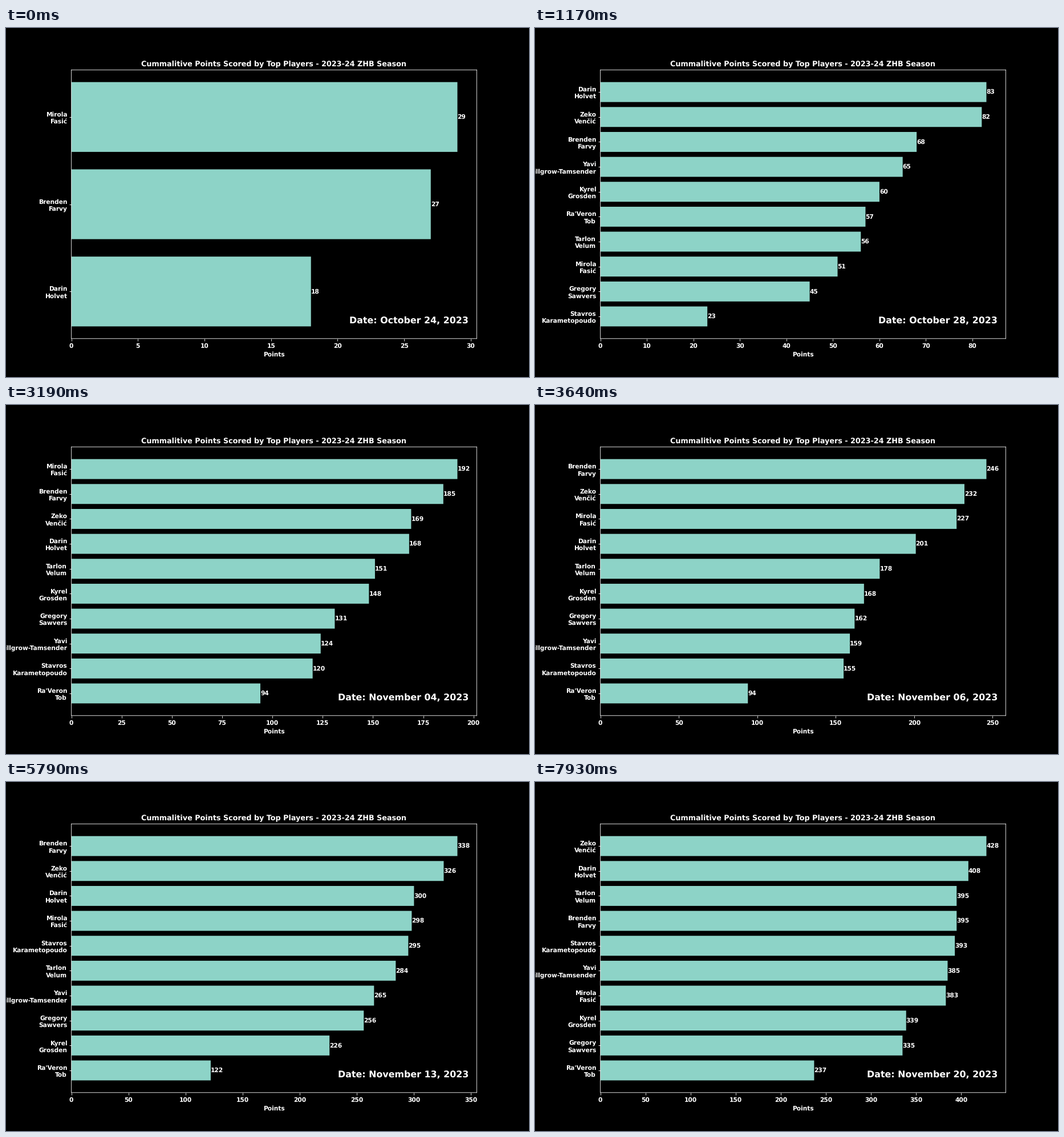
Animation, 917 px wide and 611 px high, one loop 8 s. Source, as a matplotlib script:

```python
import matplotlib.pyplot as plt
import numpy as np
from matplotlib.animation import FuncAnimation

WIDTH, HEIGHT, DPI = 917, 611, 76.4
FRAME_COUNT, INTERVAL = 123, 65

# Unsnapped paths and unhinted glyphs keep true sub-pixel positions.
plt.style.use("dark_background")
plt.rcParams.update({
    "font.family": "DejaVu Sans",
    "font.weight": "bold",
    "axes.labelweight": "bold",
    "axes.titleweight": "bold",
    "path.snap": False,
    "text.hinting": "none",
})

# Who plays on each day, starting on October 24.
SCHEDULE = (
    "MBD/ZYKRTG/DS/MBZYKRT/DKG/MBYRS/MBZYTGS/DK/"
    "MBZYKTGS/D/MBZKS/MDTG/BDZ/MBZYKTGS//MBDZYKTGS/S/DZYTG/BTS/MBDZYKG/"
    "KRTS/MZYG/DZKRTG/Y/MDKRTS/BZYKGS/MDZYRT/MBKRTGS"
).split("/")

# A day stays on screen for one frame per game played.
DAY_OF_FRAME = [day for day, games in enumerate(SCHEDULE) for _ in games]

# Totals after the first game and at the end of each key day;
# every game in between adds an equal share.
KEY_DAYS = (4, 11, 20, 27)
PLAYERS = {
    "G": ("Gregory\nSawvers", (26, 45, 131, 256, 335)),
    "R": ("Ra'Veron\nTob", (18, 57, 94, 122, 237)),
    "S": ("Stavros\nKarametopoudo", (23, 23, 120, 295, 393)),
    "K": ("Kyrel\nGrosden", (15, 60, 148, 226, 339)),
    "T": ("Tarlon\nVelum", (34, 56, 151, 284, 395)),
    "D": ("Darin\nHolvet", (18, 83, 168, 300, 408)),
    "Z": ("Zeko\nVenčić", (33, 82, 169, 326, 428)),
    "M": ("Mirola\nFasić", (29, 51, 192, 298, 383)),
    "Y": ("Yavi\nHillgrow-Tamsender", (31, 65, 124, 265, 385)),
    "B": ("Brenden\nFarvy", (27, 68, 185, 338, 395)),
}


def games_played(key, day):
    return "".join(SCHEDULE[:day + 1]).count(key)


def total_points(key, day):
    stops = [1] + [games_played(key, key_day) for key_day in KEY_DAYS]
    return round(np.interp(games_played(key, day), stops, PLAYERS[key][1]))


def standings(day):
    """Names and totals of everyone who has played, lowest total first."""
    totals = [(name, total_points(key, day))
              for key, (name, _) in PLAYERS.items() if games_played(key, day)]
    return sorted(totals, key=lambda entry: -entry[1])[::-1]


def date_text(day):
    month, number = ("October", 24 + day) if day < 8 else ("November", day - 7)
    return f"Date: {month} {number:02d}, 2023"


fig, ax = plt.subplots(figsize=((WIDTH + 0.01) / DPI, (HEIGHT + 0.01) / DPI), dpi=DPI)


def update(frame):
    day = DAY_OF_FRAME[frame]
    names, totals = zip(*standings(day))
    ax.clear()
    ax.barh(names, totals, color="#8dd3c7")
    for row, total in enumerate(totals):
        ax.text(total, row, str(total), va="center")
    ax.set_title("Cummalitive Points Scored by Top Players - 2023-24 ZHB Season")
    ax.set_xlabel("Points")
    ax.text(0.98, 0.05, date_text(day), transform=ax.transAxes,
            fontsize=15, ha="right", va="bottom")
    return []


animation = FuncAnimation(fig, update, frames=FRAME_COUNT, interval=INTERVAL,
                          init_func=lambda: [], repeat=True, repeat_delay=0)
plt.show()
```
